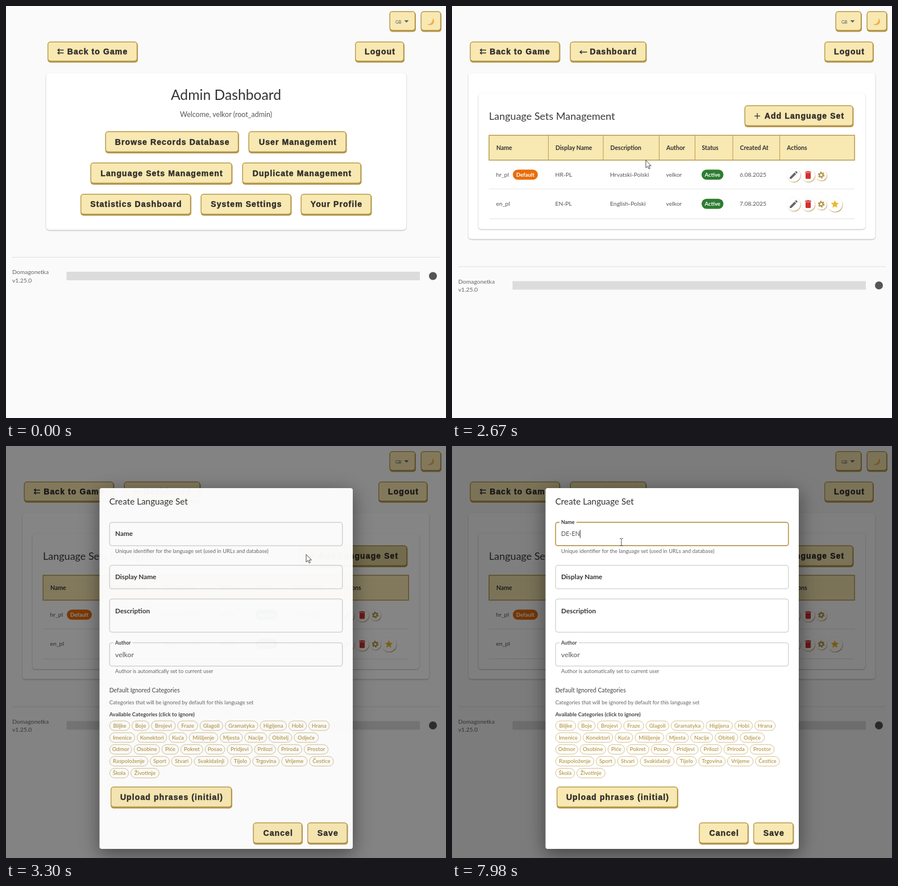
Recreate the animation shown at these times as an HTML page. Size 774 px wide and 724 px high, loop 8000 ms.

```html
<!DOCTYPE html>
<html lang="en">
<head>
<meta charset="utf-8">
<title>Language sets</title>
<style>
html, body { margin: 0; width: 100%; height: 100%; overflow: hidden; background: #fafafa; }
svg { display: block; width: 774px; height: 724px; }
text { font-family: Lato, "Open Sans", sans-serif; white-space: pre; }
.btn text { font: bold 14px "Liberation Sans", Arial, sans-serif; letter-spacing: 1.1px; fill: #2f2c2a; stroke: #2f2c2a; stroke-width: .45px; }
.btn .edge { fill: #b3954a; }
.btn .face { fill: #f8e8b2; stroke: #b8994c; stroke-width: 1.4px; }
.btn .icon { fill: none; stroke: #2f2c2a; stroke-width: 1.3px; }
.btn.hot .top { transform: translateY(1.5px); }
.btn.hot .face { fill: #e8cd82; }
.card { fill: #fff; filter: drop-shadow(0 1px 1px rgba(0,0,0,.28)); }
.dialog { fill: #fff; filter: drop-shadow(0 9px 14px rgba(0,0,0,.3)) drop-shadow(0 6px 20px rgba(0,0,0,.2)); }
</style>
</head>
<body>
<svg id="stage" viewBox="0 0 774 724" xmlns="http://www.w3.org/2000/svg"></svg>
<script>
const GOLD = '#b8994c', CREAM = '#f8e8b2', DARK = '#333', GREY = '#555';
const LOOP = 8000;
const USER = 'velkor';

// Drawing helpers
const text = (x, y, s, size, { fill = GREY, weight = 400, anchor = 'start', id = '' } = {}) =>
  `<text ${id && `id="${id}"`} x="${x}" y="${y}" font-size="${size}" font-weight="${weight}" fill="${fill}" text-anchor="${anchor}">${s}</text>`;
const rect = (x, y, w, h, attrs = '') => `<rect x="${x}" y="${y}" width="${w}" height="${h}" ${attrs}/>`;
const line = (x1, y1, x2, y2, color) => `<path d="M${x1} ${y1}L${x2} ${y2}" stroke="${color}"/>`;
const group = (id, body, attrs = '') => `<g id="${id}" ${attrs}>${body}</g>`;

const hotspots = [];
function button(page, id, x, y, w, h, label = '', { icon = '', shift = 0 } = {}) {
  hotspots.push({ page, id, x, y, w, h });
  const mid = x + w / 2 + shift;
  return group(id, rect(x + .3, y + 1.5, w - .3, h - 1.5, 'rx="5" class="edge"') +
    '<g class="top">' + rect(x + .7, y + .7, w - 2.2, h - 3.6, 'rx="4.5" class="face"') +
    (label && `<text x="${mid + .5}" y="${y + h / 2 + 4}" text-anchor="middle">${label}</text>`) +
    icon + '</g>', 'class="btn"');
}
const stroked = d => `<path class="icon" d="${d}"/>`;
const swapArrows = x =>
  stroked(`M${x} 77.5h10.5m-7.5 -2.5l-3 2.5 3 2.5M${x} 82.5h10.5m-7.5 -2.5l-3 2.5 3 2.5`);
const backButton = (page, id, x) =>
  button(page, id, x, 62.5, 159, 37, 'Back to Game', { icon: swapArrows(x + 18), shift: 8 });
const logout = (page, id, x) => button(page, id, x, 62.5, 87, 37, 'Logout');

function footer(y) {
  return line(11, y + .5, 763, y + .5, '#dedede') +
    text(11, y + 30, 'Domagonetka', 10.4, { fill: '#666' }) +
    text(11, y + 44.7, 'v1.25.0', 10.4, { fill: '#666' }) +
    rect(106.5, y + 26, 621.5, 15, 'fill="#dcdcdc"') +
    `<circle cx="751" cy="${y + 33.5}" r="7" fill="#555"/>`;
}

function pill(x, y, w, label, fill) {
  return rect(x, y - 9, w, 17.8, `rx="8.9" fill="${fill}"`) +
    text(x + w / 2, y + 3.4, label, 9.6, { fill: '#fff', weight: 700, anchor: 'middle' });
}

// Round action icons
const PENCIL = 'M3 17.25V21h3.75L17.81 9.94l-3.75-3.75zM20.71 7.04c.39-.39.39-1.02 0-1.41l-2.34-2.34c-.39-.39-1.02-.39-1.41 0l-1.83 1.83 3.75 3.75z';
const TRASH = 'M6 19c0 1.1.9 2 2 2h8c1.1 0 2-.9 2-2V7H6zM19 4h-3.5l-1-1h-5l-1 1H5v2h14z';
const STAR = 'M12 17.27 18.18 21l-1.64-7.03L22 9.24l-7.19-.61L12 2 9.19 8.63 2 9.24l5.46 4.73L5.82 21z';
const disc = (x, y, r) => `<circle cx="${x + .7}" cy="${y + 1.1}" r="${r}" fill="${GOLD}"/>` +
  `<circle cx="${x}" cy="${y}" r="${r}" fill="#fff" stroke="#eee" stroke-width=".5"/>`;
const glyph = (x, y, d, fill, scale = .76) =>
  `<path transform="translate(${x} ${y}) scale(${scale}) translate(-12 -12)" d="${d}" fill="${fill}"/>`;
const gear = (x, y) => `<g fill="none" stroke="${GOLD}"><circle cx="${x}" cy="${y}" r="3.2" stroke-width="2.4"/>` +
  `<circle cx="${x}" cy="${y}" r="4.9" stroke-width="2" stroke-dasharray="2.7 2.43"/></g>`;

function tableRow(y, id, shown, about, date, isDefault) {
  const cell = (x, s) => text(x, y + 3.7, s, 10.4);
  return cell(77.5, id) + cell(181.5, shown) + cell(278, about) + cell(376.5, USER) + cell(506, date) +
    (isDefault ? pill(107, y, 44, 'Default', '#ea6d0a') : '') +
    pill(439, y, 38.5, 'Active', '#2e7d32') +
    disc(601, y + .5, 12) + glyph(601, y + .5, PENCIL, '#666') +
    disc(626.5, y + .5, 12) + glyph(626.5, y + .5, TRASH, '#d32f2f') +
    disc(649.5, y + .5, 10) + gear(649.5, y + .5) +
    (isDefault ? '' : disc(673.5, y + .5, 13.3) + glyph(673.5, y + .5, STAR, '#eab92d', .7));
}

const topBar =
  button(0, 'locale', 674.5, 9, 46.5, 36.5) + text(685, 30.5, 'GB', 7.6) +
  '<path d="M700.5 25h8l-4 4.2z" fill="#666"/>' +
  button(0, 'theme', 729.5, 9, 36.5, 36.5) +
  '<path d="M750.5 21.3C757 28 750 37 740.7 32.3C747 32.6 751.4 28 750.5 21.3Z" fill="#f3ad45"/>';

const home = backButton(1, 'back1', 73) + logout(1, 'logout1', 614) +
  rect(70.5, 118, 633.5, 275.5, 'rx="6" class="card"') +
  text(387, 165, 'Admin Dashboard', 24.7, { fill: DARK, anchor: 'middle' }) +
  text(387, 194.5, `Welcome, ${USER} (root_admin)`, 12.5, { anchor: 'middle' }) +
  button(1, 'browse', 174.5, 220, 235.5, 39, 'Browse Records Database') +
  button(1, 'users', 426.5, 220, 173, 39, 'User Management') +
  button(1, 'sets', 148.5, 275, 250, 39, 'Language Sets Management') +
  button(1, 'dupes', 415.5, 275, 210, 39, 'Duplicate Management') +
  button(1, 'stats', 131, 330, 195, 38.5, 'Statistics Dashboard') +
  button(1, 'system', 342.5, 330, 160, 38.5, 'System Settings') +
  button(1, 'profile', 518.5, 330, 125, 38.5, 'Your Profile') +
  footer(441);

const headings = [[78, 'Name'], [182, 'Display Name'], [278.5, 'Description'], [377, 'Author'],
  [439.5, 'Status'], [506.5, 'Created At'], [589, 'Actions']];
const manage = backButton(2, 'back2', 31.5) +
  button(2, 'dash', 207.5, 62.5, 135, 37, 'Dashboard',
    { icon: stroked('M225 81h12.5m-9 -3l-3.5 3 3.5 3'), shift: 8.5 }) +
  logout(2, 'logout2', 655) +
  rect(29, 118, 715.5, 291.5, 'rx="5" class="card"') +
  rect(46.5, 153.5, 680.5, 238.5, 'rx="5" class="card"') +
  text(65, 199.7, 'Language Sets Management', 18, { fill: '#3a3a3a' }) +
  button(2, 'add', 514.5, 174.5, 192, 38.5, 'Add Language Set',
    { icon: stroked('M532 193.3h10m-5 -5v10'), shift: 9 }) +
  `<clipPath id="addClip">${rect(515, 175, 190, 36.5, 'rx="5"')}</clipPath>` +
  '<circle id="ripple" cx="648" cy="193" clip-path="url(#addClip)" fill="#4a3800"/>' +
  rect(65.2, 227.2, 643, 43.6, `fill="${CREAM}" stroke="${GOLD}" stroke-width="1.5"`) +
  [169.5, 266, 364.5, 427.5, 494, 576.5].map(x => line(x, 227, x, 271, GOLD)).join('') +
  headings.map(([x, s]) => text(x, 252.6, s, 10.5, { fill: DARK, weight: 700 })).join('') +
  tableRow(296.5, 'hr_pl', 'HR-PL', 'Hrvatski-Polski', '6.08.2025', true) +
  line(65, 321.5, 708, 321.5, '#e4e4e4') +
  tableRow(347.7, 'en_pl', 'EN-PL', 'English-Polski', '7.08.2025', false) +
  line(65, 374, 708, 374, '#e0e0e0') +
  footer(457.5);

// Category chips: label and outline width, flowing left to right
const chipRows = [
  'Biljke 36 Boje 31 Brojevi 43 Fraze 36 Glagoli 41 Gramatyka 58.5 Higijena 47 Hobi 32 Hrana 37',
  'Imenice 45 Konektori 53 Kuća 32 Mišljenje 51.5 Mjesta 40 Nacije 39.5 Obitelj 41 Odjeće 43.5',
  'Odmor 39.5 Osobine 46 Piće 30 Pokret 39.5 Posao 35.5 Pridjevi 45 Prilozi 38 Priroda 43 Prostor 43',
  'Raspoloženje 68 Sport 34.5 Stvari 36.5 Svakidašnji 60.5 Tijelo 36 Trgovina 47.5 Vrijeme 46 Čestice 43',
  'Škola 34 Životinje 50.5'
];
const chips = chipRows.map((row, r) => {
  let x = 182;
  const y = 491.5 + r * 20.83;
  return row.replace(/(\S+) ([\d.]+) ?/g, (_, label, w) => {
    const chip = rect(x + .4, y - 8.4, w - .8, 16.8, `rx="8.4" fill="#fff" stroke="#cdb87f" stroke-width=".9"`) +
      text(x + w / 2, y + 3.3, label, 9.6, { fill: GOLD, weight: 600, anchor: 'middle' });
    x += +w + 3.2;
    return chip;
  });
}).join('');

const field = (y, h, id = '') =>
  rect(182.2, y, 409.6, h, `${id && `id="${id}"`} rx="4" fill="none" stroke="#c2c2c2"`);
const label = (y, s, id) => text(192, y, s, 11.8, { fill: DARK, weight: 700, id });
const small = (x, y, s) => text(x, y, s, 9.4, { fill: '#666' });

const dialog = rect(164.5, 74, 445.5, 634, 'rx="4" class="dialog"') +
  text(181.7, 103.3, 'Create Language Set', 15.3, { fill: DARK }) +
  field(134.2, 41, 'nameBox') + rect(189, 132, 30, 4, 'id="nameGap" fill="#fff"') +
  label(158, 'Name', 'nameLabel') +
  text(192, 158, '', 10.8, { id: 'typed' }) +
  rect(192, 147.5, 1, 14, 'id="caret" fill="#333"') +
  small(192, 187.6, 'Unique identifier for the language set (used in URLs and database)') +
  field(209.7, 41.2) + label(234.2, 'Display Name') +
  field(268.8, 58.4) + label(293.6, 'Description') +
  field(345.8, 41) + rect(189, 344, 34, 4, 'fill="#fff"') +
  text(192, 348.6, 'Author', 8.8, { fill: '#444', weight: 700 }) +
  text(192, 370.6, USER, 12.3) +
  small(192, 399.2, 'Author is automatically set to current user') +
  text(181.7, 433.2, 'Default Ignored Categories', 10.5, { fill: '#444' }) +
  small(181.7, 454, 'Categories that will be ignored by default for this language set') +
  text(181.7, 474.7, 'Available Categories (click to ignore)', 9.4, { fill: '#444', weight: 700 }) +
  chips +
  button(3, 'upload', 184, 598.5, 214, 38.5, 'Upload phrases (initial)') +
  button(3, 'cancel', 434.5, 661.5, 87.5, 39, 'Cancel') +
  button(3, 'save', 530, 661.5, 71.5, 39, 'Save');

const pointers =
  group('arrow', '<path d="M0 0V13.5L3.2 10.6L5.3 15.2L7.3 14.3L5.2 9.8H9.3Z" fill="#fff" stroke="#333" stroke-width=".9"/>') +
  group('hand', '<path d="M-1.5 1C-1.5 -.6 1 -.6 1 1V7L5.5 7.8Q8 8.3 7.8 11L7 15V18H-.5V15.5L-4.3 10.8C-5 9.5 -3.4 8.6 -2.5 9.8L-1.5 11Z" fill="#fff" stroke="#333" stroke-width=".9"/>') +
  group('beam', '<path d="M-3 -6.5Q-.5 -6.5 0 -5.5Q.5 -6.5 3 -6.5M0 -5.5V5.5M-3 6.5Q-.5 6.5 0 5.5Q.5 6.5 3 6.5" fill="none" stroke="#555"/>');

const stage = document.getElementById('stage');
stage.innerHTML = rect(0, 0, 774, 724, 'fill="#fafafa"') + topBar + group('home', home) + group('manage', manage) +
  rect(0, 0, 774, 724, 'id="shade"') + group('dialog', dialog) + group('pointer', pointers);
const $ = id => document.getElementById(id);
const set = (id, attrs) => { for (const k in attrs) $(id).setAttribute(k, attrs[k]); };
const show = (id, on) => set(id, { visibility: on ? 'visible' : 'hidden' });

// Pointer path: time, x, y
const path = [
  [760, 102, 193], [1030, 186, 238], [1300, 226, 305], [1480, 207, 298], [1660, 206, 300],
  [2400, 206, 300], [2580, 262, 290], [2760, 420, 252], [2940, 585, 214], [3120, 646, 197],
  [3210, 642.5, 198], [3300, 528, 190.5], [3480, 380, 177], [3750, 306, 170], [4020, 298, 169]
];
function pointerAt(t) {
  const next = path.findIndex(k => k[0] > t);
  if (next < 0) return path[path.length - 1].slice(1);
  if (next === 0) return path[0].slice(1);
  const [a, b] = [path[next - 1], path[next]];
  const p = (t - a[0]) / (b[0] - a[0]);
  return [a[1] + (b[1] - a[1]) * p, a[2] + (b[2] - a[2]) * p];
}

const typing = [[5120, 'D'], [5300, 'DE'], [7340, 'DE-'], [7710, 'DE-E'], [7980, 'DE-EN']];
const caretSwitches = [4020, 4390, 4940, 5860, 6420, 6970, 7340];

function update(t) {
  const page = t < 1570 ? 1 : t < 3210 ? 2 : 3;
  show('home', page === 1);
  show('manage', page > 1);

  // The screen refreshes every 90 ms while things move
  const phase = t < 2000 ? 40 : 60;
  const tick = Math.floor((t - phase) / 90) * 90 + phase;

  const fade = page < 3 ? 0 : t < 3300 ? .22 : t < 3390 ? .96 : 1;
  set('shade', { opacity: fade * .5 });
  set('dialog', { opacity: fade });
  const rippling = t >= 3210 && t < 3390;
  set('ripple', { r: t < 3300 ? 40 : 100, opacity: rippling ? .16 : 0 });

  const [x, y] = pointerAt(tick);
  let overButton = false;
  for (const h of hotspots) {
    const hot = t >= 760 && h.page === page && x > h.x && x < h.x + h.w && y > h.y && y < h.y + h.h;
    $(h.id).classList.toggle('hot', hot);
    overButton = overButton || hot;
  }
  const overText = (t >= 1660 && t < 2490) || t >= 3570;
  const shape = overButton ? 'hand' : overText ? 'beam' : 'arrow';
  for (const s of ['arrow', 'hand', 'beam']) $(s).style.display = s === shape ? '' : 'none';
  set('pointer', { transform: `translate(${x} ${y})` });
  show('pointer', t >= 760);

  const focused = t >= 4020, settled = t >= 4110;
  set('nameBox', { stroke: focused ? GOLD : '#c2c2c2', 'stroke-width': focused ? 1.7 : 1 });
  $('nameGap').style.display = focused ? '' : 'none';
  set('nameLabel', { y: settled ? 136.6 : focused ? 146 : 158, 'font-size': settled ? 8.9 : focused ? 10.2 : 11.8 });

  const value = typing.filter(k => k[0] <= t).map(k => k[1]).pop() || '';
  if ($('typed').textContent !== value) $('typed').textContent = value;
  set('caret', { x: 192 + (value ? $('typed').getComputedTextLength() : 0) });
  const caretOn = caretSwitches.filter(s => s <= t).length % 2 === 1;
  $('caret').style.display = caretOn ? '' : 'none';
}

function frame() {
  update(performance.now() % LOOP);
  requestAnimationFrame(frame);
}
frame();
</script>
</body>
</html>
```
